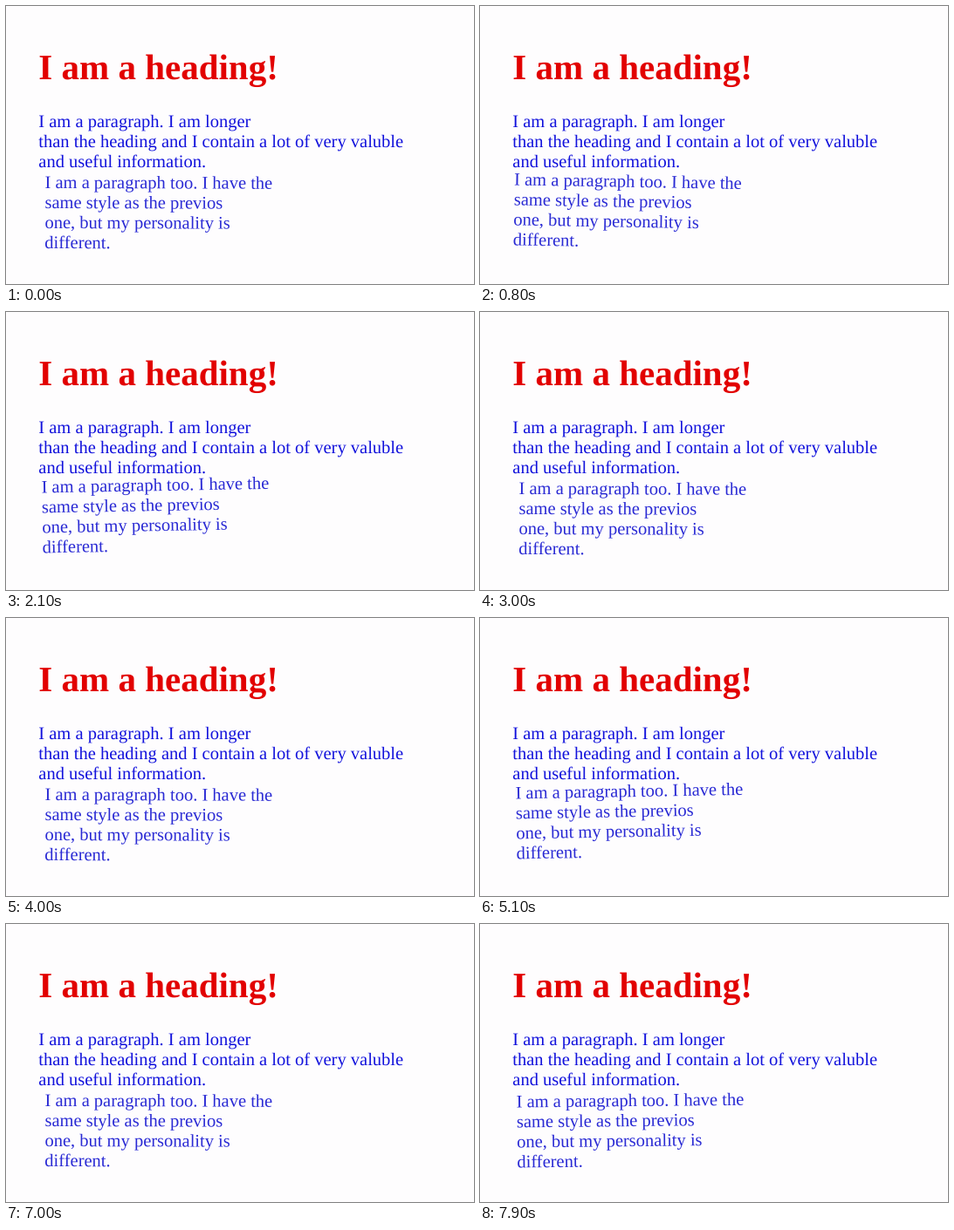
Recreate the animation shown at these times as an HTML page. Size 536 by 319 pixels, loop 8 s.

```html
<!DOCTYPE html>
<html lang="en">
<head>
<meta charset="utf-8">
<title>Shaking paragraph</title>
<style>
  html, body { margin: 0; width: 100%; height: 100%; overflow: hidden; background: #fefdfe; }
  svg { display: block; width: 536px; height: 319px; }
  text { font: 20.5px "Liberation Serif", "Times New Roman", serif; fill: #1212dc; text-rendering: geometricPrecision; }
  .heading { font-size: 41px; font-weight: bold; fill: #e20000; }
  #shaky { fill: #1414d0; opacity: .9; }
</style>
</head>
<body>
<svg viewBox="0 0 536 319">
  <text class="heading" x="37.3" y="83.7">I am a heading!</text>
  <text y="138.7">
    <tspan x="37.3">I am a paragraph. I am longer</tspan>
    <tspan x="37.3" dy="23">than the heading and I contain a lot of very valuble</tspan>
    <tspan x="37.3" dy="23">and useful information.</tspan>
  </text>
  <text id="shaky" y="207.7">
    <tspan x="42.4">I am a paragraph too. I have the</tspan>
    <tspan x="42.4" dy="23">same style as the previos</tspan>
    <tspan x="42.4" dy="23">one, but my personality is</tspan>
    <tspan x="42.4" dy="23">different.</tspan>
  </text>
</svg>
<script>
  const LOOP = 8000, STEP = 100, ZOOM = 1.28;
  const shaky = document.getElementById('shaky');

  // One shake cycle, a pose per step: x, y, degrees.
  const poses = [[1.6, 1.3, .15], [-1, -2, -1], [0, 2, 0], [-3, 0, 1], [-.3, 1.1, -.6]];

  function draw(now) {
    const step = Math.floor(now % LOOP / STEP);
    const [x, y, turn] = poses[step % poses.length];
    shaky.setAttribute('transform', `translate(${x * ZOOM} ${y * ZOOM}) rotate(${turn} 172 236)`);
  }

  const start = performance.now();
  function tick() {
    draw(performance.now() - start);
    requestAnimationFrame(tick);
  }
  tick();
</script>
</body>
</html>
```
